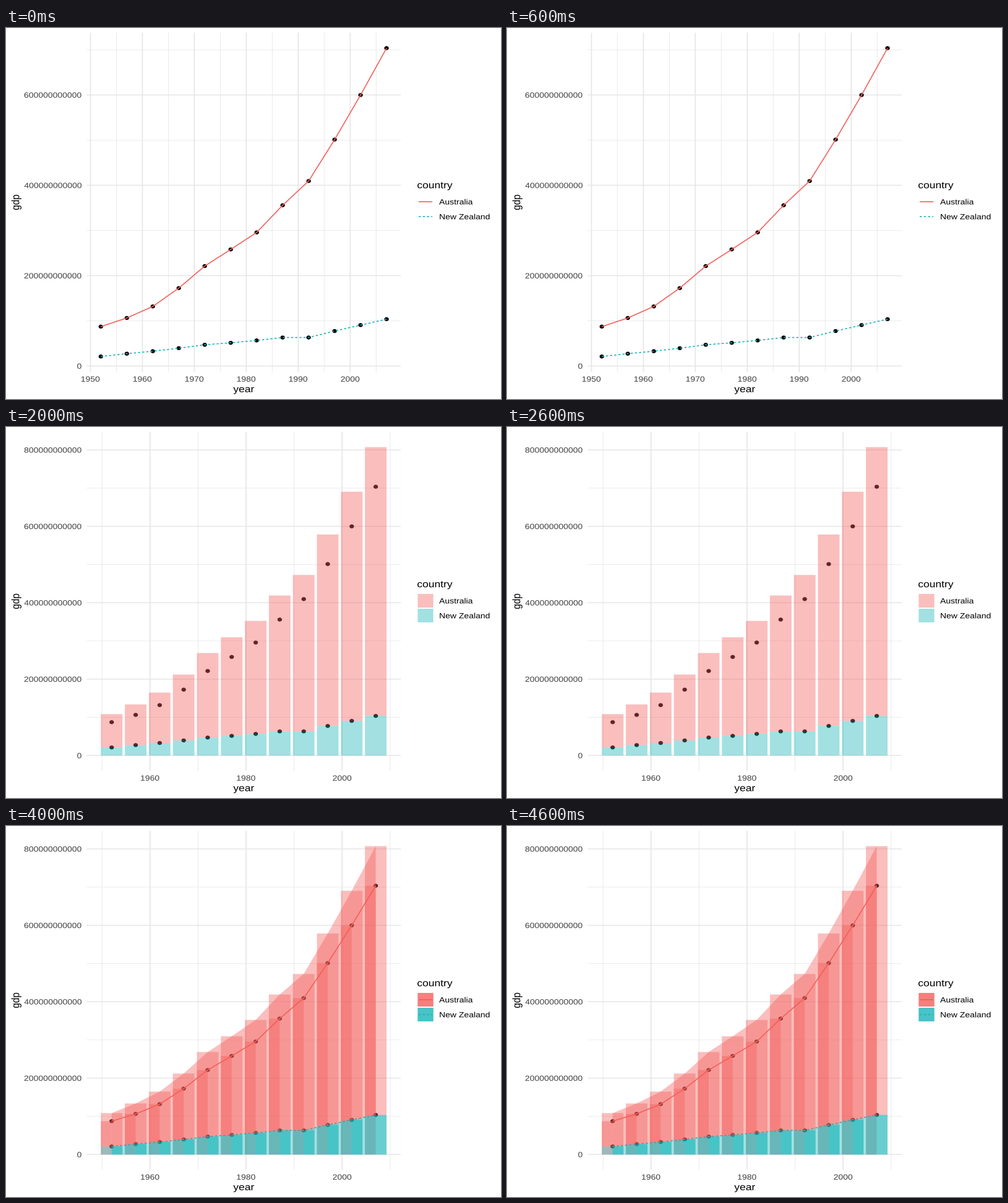
A matplotlib script for the animation above (5000 ms loop, 800 by 600 pixels).

```python
import matplotlib.pyplot as plt
import numpy as np
from matplotlib.animation import FuncAnimation
from matplotlib.patches import Circle, PathPatch, Polygon, Rectangle
from matplotlib.textpath import TextPath
from matplotlib.transforms import Affine2D

plt.rcParams["font.family"] = "Liberation Sans"
plt.rcParams["path.snap"] = False

# The page is 504 x 432 pt, shown on 800 x 600 px.
PAGE_W, PAGE_H = 504, 432
LEFT, RIGHT, BOTTOM, TOP = 82.03, 402.0, 31.54, 426.5
MID_X, MID_Y = (LEFT + RIGHT) / 2, (BOTTOM + TOP) / 2
SMALL, LARGE = 8.8, 11
RED, TEAL, GRID, INK = "#F35E5A", "#17B3B7", "#E6E6E6", "#404040"
ALPHA = 0.4

YEARS = np.arange(1952, 2008, 5)
# GDP in billions
AUS = np.array([87.256, 106.349, 131.885, 172.458, 221.224, 258.037,
                295.743, 355.853, 409.511, 501.223, 599.847, 703.658])
NZL = np.array([21.058, 27.304, 32.788, 39.460, 47.000, 51.378,
                56.611, 63.050, 63.127, 77.385, 90.628, 103.656])
TOTAL = AUS + NZL
COUNTRIES = [("Australia", RED, "-"), ("New Zealand", TEAL, (0, (2.1, 2.1)))]

SCENES = [("line",), ("dodge",), ("stack",), ("area",),
          ("line", "dodge", "stack", "area")]

fig = plt.figure(figsize=(8, 6), dpi=100, facecolor="white")
ax = fig.add_axes([0, 0, 1, 1])


def px(width):
    return width * 72 / fig.dpi


def scale(lo, hi, start, end):
    """Map lo..hi to start..end with 5% padding on both sides."""
    pad = 0.05 * (hi - lo)
    lo, hi = lo - pad, hi + pad
    return lambda v: start + (v - lo) / (hi - lo) * (end - start), lo, hi


def stroke(x, y, color, width=1.6, style="-"):
    ax.plot(x, y, color=color, lw=px(width), ls=style,
            solid_capstyle="butt", dash_capstyle="butt",
            solid_joinstyle="round")


def fill(patch, color, alpha=ALPHA):
    patch.set(facecolor=color, alpha=alpha, linewidth=0)
    ax.add_artist(patch)


def text(x, y, label, size=SMALL, color="black", align=0.0, angle=0):
    path = TextPath((0, 0), label, size=size)
    box = path.get_extents()
    move = Affine2D().translate(-align * (box.x0 + box.x1), 0)
    move.rotate_deg(angle).translate(x, y)
    fill(PathPatch(move.transform_path(path)), color, 1)


def draw_grid(sx, sy, x_lo, x_hi, y_lo, y_hi, step):
    def lines(lo, hi, gap, major):
        for v in range(int(np.ceil(lo / gap)) * gap, int(hi) + 1, gap):
            if (v % (2 * gap) == 0) == major:
                yield v

    for major in (False, True):
        k = 1 if major else 0.5
        for v in lines(y_lo, y_hi, 100, major):
            stroke([LEFT, RIGHT], [sy(v)] * 2, GRID, 1.48 * k)
            if major:
                text(LEFT - 4.95, sy(v) - 0.36 * SMALL, str(v * 10**9),
                     color=INK, align=1)
        for v in lines(x_lo, x_hi, step, major):
            stroke([sx(v)] * 2, [BOTTOM, TOP], GRID, 1.69 * k)
            if major:
                text(sx(v), 20.23, str(v), color=INK, align=0.5)


def draw_bars(sx, sy, offset, width, base, top, color):
    for year, lo, hi in zip(YEARS, base, top):
        x, y = sx(year + offset), sy(lo)
        fill(Rectangle((x, y), sx(year + offset + width) - x, sy(hi) - y),
             color)


def draw_layer(kind, sx, sy):
    zero = np.zeros(len(YEARS))
    if kind == "line":
        for values, (_, color, style) in zip((AUS, NZL), COUNTRIES):
            stroke(sx(YEARS), sy(values), color, style=style)
    elif kind == "dodge":
        draw_bars(sx, sy, -2.25, 2.25, zero, AUS, RED)
        draw_bars(sx, sy, 0, 2.25, zero, NZL, TEAL)
    elif kind == "stack":
        draw_bars(sx, sy, -2.25, 4.5, NZL, TOTAL, RED)
        draw_bars(sx, sy, -2.25, 4.5, zero, NZL, TEAL)
    else:
        for lo, hi, color in ((NZL, TOTAL, RED), (zero, NZL, TEAL)):
            xs = np.r_[sx(YEARS), sx(YEARS[::-1])]
            ys = np.r_[sy(hi), sy(lo[::-1])]
            fill(Polygon(np.c_[xs, ys]), color)


def draw_legend(layers):
    text(418.5, 245.4, "country", LARGE)
    x, side = 427.14, 15.86
    for row, (name, color, style) in enumerate(COUNTRIES):
        y = 229.7 - 17.28 * row
        for kind in layers:
            if kind == "line":
                stroke([x - 6.91, x + 6.91], [y, y], color, style=style)
            else:
                fill(Rectangle((x - side / 2, y - side / 2), side, side),
                     color)
        text(441, y - 0.36 * SMALL, name)


def draw(i):
    layers = SCENES[i]
    ax.clear()
    ax.axis("off")
    ax.set(xlim=(0, PAGE_W), ylim=(0, PAGE_H), autoscale_on=False)

    barred = "dodge" in layers or "stack" in layers
    stacked = "stack" in layers or "area" in layers
    edge = 2.25 if barred else 0
    low = NZL.min() if layers == ("line",) else 0
    high = TOTAL.max() if stacked else AUS.max()
    sx, x_lo, x_hi = scale(YEARS[0] - edge, YEARS[-1] + edge, LEFT, RIGHT)
    sy, y_lo, y_hi = scale(low, high, BOTTOM, TOP)

    draw_grid(sx, sy, x_lo, x_hi, y_lo, y_hi, 10 if barred else 5)
    for values in (AUS, NZL):
        for x, y in zip(sx(YEARS), sy(values)):
            fill(Circle((x, y), 2.31), "black", 1)
    for kind in layers:
        draw_layer(kind, sx, sy)

    text(MID_X, 7.92, "year", LARGE, align=0.5)
    text(13.42, MID_Y, "gdp", LARGE, align=0.5, angle=90)
    draw_legend(layers)

    # Paint strictly in drawing order
    for order, artist in enumerate(ax.get_children()):
        if artist in ax.lines or artist in ax.patches:
            artist.set_zorder(2 + order / 1000)
    return []


anim = FuncAnimation(fig, draw, frames=len(SCENES), interval=1000,
                     repeat=True, blit=False)
plt.show()
```
